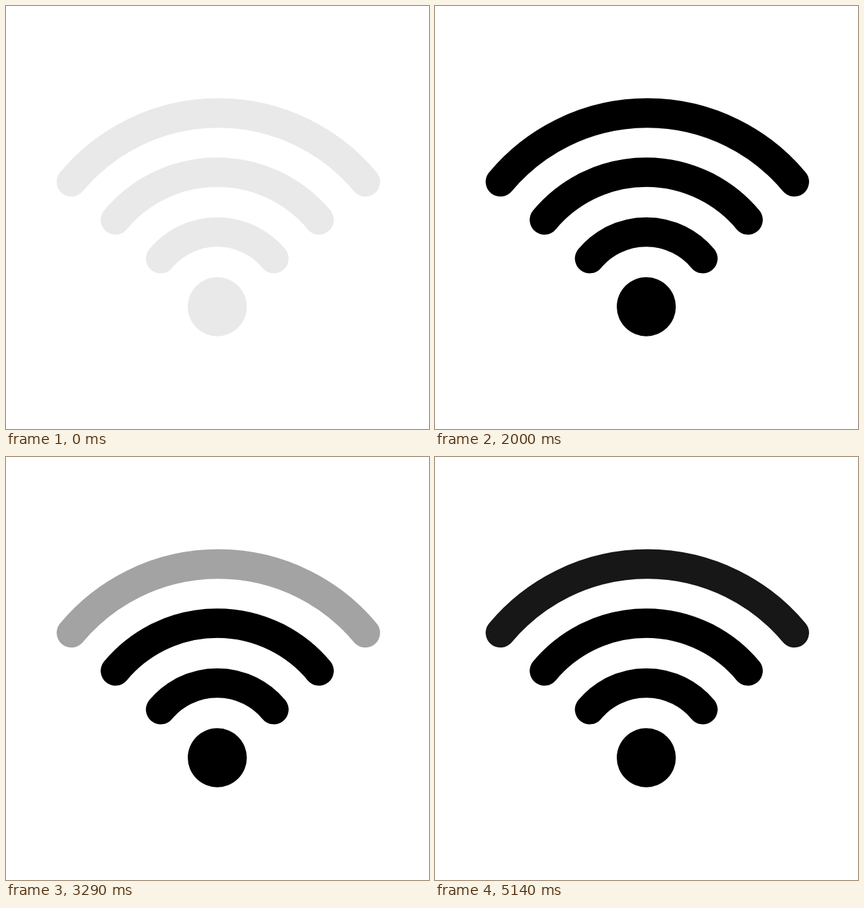
These frames come from a looping animation (640x640 px, 5210 ms). An HTML page:

```html
<!DOCTYPE html>
<html lang="en">
<head>
<meta charset="utf-8">
<title>Signal strength</title>
<style>
  html, body { margin: 0; width: 100%; height: 100%; overflow: hidden; background: #fff; }
  svg { display: block; width: 100%; height: 100%; }
  .arc { fill: none; stroke: currentColor; stroke-width: 44.7; stroke-linecap: round; }
  .part { color: #e9e9e9; }
</style>
</head>
<body>
<svg viewBox="0 0 640 640">
  <circle class="part" cx="319.7" cy="455" r="44.7" fill="currentColor"/>
  <path class="part arc" d="M234 382.1A111.5 111.5 0 0 1 405.3 382.1"/>
  <path class="part arc" d="M165.6 323.6A200.5 200.5 0 0 1 473.6 323.6"/>
  <path class="part arc" d="M99 266A289.4 289.4 0 0 1 543.6 266"/>
</svg>
<script>
  const LOOP = 5210;   // ms
  const FRAMES = 73;
  const FPS = 14;
  const TICKS = 25;    // fade ticks per second
  const FADE = 10;     // ticks for one part to turn black
  const LIGHT = 233;

  const parts = [...document.querySelectorAll('.part')];
  const cycle = FADE * parts.length;
  const clamp = v => Math.min(1, Math.max(0, v));

  // Ticks into the current cycle; one light cycle-start pause comes first.
  function phaseAt(frame) {
    const tick = Math.ceil(frame * TICKS / FPS) - FADE;
    return tick <= 0 ? 0 : (tick - 1) % cycle + 1;
  }

  function shade(frame, index) {
    const done = clamp((phaseAt(frame) - index * FADE) / FADE);
    const v = Math.round(LIGHT * (1 - done));
    return `rgb(${v}, ${v}, ${v})`;
  }

  // Frame times fall on whole hundredths of a second.
  const startOf = frame => Math.round(frame * 100 / FPS) * 10;

  parts.forEach((part, index) => {
    const steps = Array.from({ length: FRAMES }, (_, frame) => ({
      offset: Math.max(0, startOf(frame) - 0.5) / LOOP,
      color: shade(frame, index),
      easing: 'step-end'
    }));
    steps.push({ offset: 1, color: shade(FRAMES - 1, index) });
    part.animate(steps, { duration: LOOP, iterations: Infinity });
  });
</script>
</body>
</html>
```
